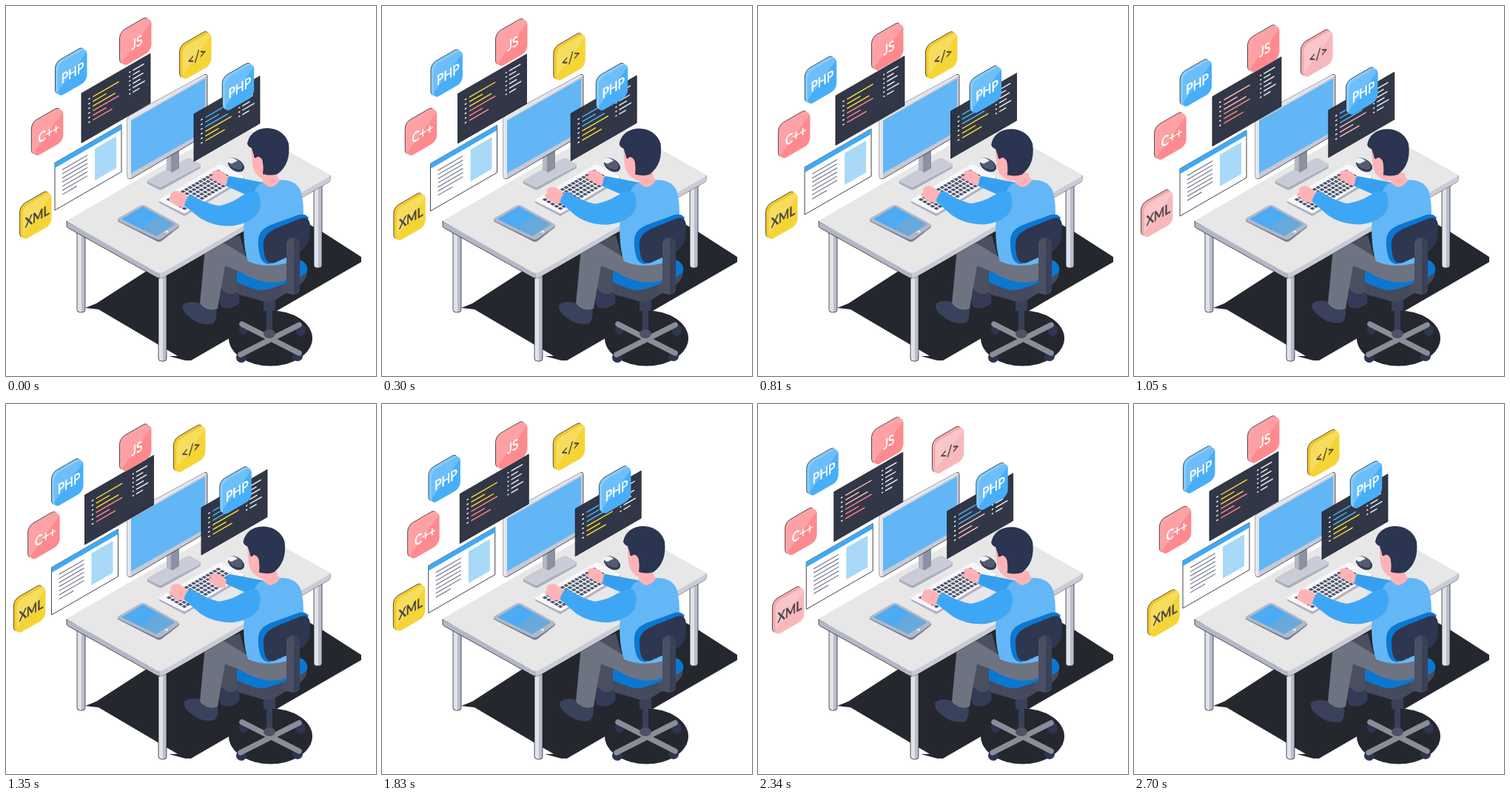
Animation, 500 px wide and 500 px high, one loop 2760 ms. Source, as an HTML page:

```html
<!DOCTYPE html>
<html lang="en">
<head>
<meta charset="utf-8">
<title>Programmer at a desk</title>
<style>
  html, body { margin: 0; width: 100%; height: 100%; overflow: hidden; background: #fff; }
  svg { display: block; width: 100vw; height: 100vh; --yellow: #f5d535; --amber: #f3c92f; }
  svg.rosy { --yellow: #f8b8bb; --amber: #f5a9ad; }
  text { font: 18px Lato, sans-serif; text-anchor: middle; stroke-width: .6; }
  .edge { stroke: #15171c; stroke-width: .7; }
  .line { fill: none; stroke-linecap: round; }
  .skin { fill: #ffb3b6; }
</style>
</head>
<body>
<svg id="stage" viewBox="0 0 500 500">
  <defs>
    <linearGradient id="sheen" x2=".7" y2="1">
      <stop offset=".55" stop-color="#fff" stop-opacity=".2"/>
      <stop offset=".55" stop-color="#fff" stop-opacity="0"/>
    </linearGradient>
    <linearGradient id="leg">
      <stop offset=".55" stop-color="#e0e2e9"/>
      <stop offset=".55" stop-color="#b9bcca"/>
    </linearGradient>
  </defs>

  <!-- Shadows -->
  <path fill="#24272e" d="M107 408L122 402 345 258 427 305 480 339V346L250 479H242L220 473H232L125 410Z"/>
  <ellipse fill="#24272e" cx="357.500" cy="449" rx="56.500" ry="37.500"/>

  <!-- Chair base and seat -->
  <g fill="#2d3550">
    <ellipse cx="321" cy="437" rx="6" ry="7"/><ellipse cx="398" cy="438" rx="7" ry="8"/>
    <ellipse cx="318" cy="475" rx="7" ry="7"/><ellipse cx="394" cy="473" rx="7" ry="7"/>
  </g>
  <path class="line" stroke="#8b8e99" stroke-width="7.500" d="M319 430L396 469M396 431L317 471"/>
  <path fill="#3a4058" d="M348 385H364V412H360V440H352V412H348Z"/>
  <ellipse fill="#4d5265" cx="356" cy="443" rx="8" ry="6"/>
  <path fill="#454a5d" d="M295 354L335 342 404 352C409 360 406 370 398 376L364 397Q352 402 340 397L308 388Q297 384 296 376Z"/>
  <path fill="#0a78d1" d="M303 364L350 341 400 344Q409 350 407 359Q402 367 360 381Q344 387 331 381L306 371Q302 368 303 364Z"/>

  <!-- Legs -->
  <path fill="#4b5060" d="M276 322L316 310 326 345 312 350 312 388Q302 394 291 386L292 345Z"/>
  <path fill="#343b57" d="M291 382Q301 394 313 386Q317 393 315 402Q305 411 293 408Q287 404 289 392Z"/>
  <g id="foot"><path fill="#3a415c" d="M239 404Q247 397 263 402Q276 411 284 410Q286 422 280 429Q263 433 249 421Q237 413 239 404Z"/></g>
  <path fill="#6e7381" d="M269 328Q280 316 298 322L338 347 388 338Q397 350 388 364Q374 376 352 373Q335 371 318 360L296 351 286 409Q272 414 262 402Z"/>

  <!-- Desk -->
  <g class="edge" fill="url(#leg)">
    <rect x="416" y="238" width="11" height="116" rx="4"/>
    <rect x="96" y="296" width="11" height="118" rx="4"/>
    <rect x="206" y="356" width="11" height="124" rx="4"/>
  </g>
  <path class="edge" fill="#b3b6c4" d="M82 291V297Q82 299 84 300L204 367Q208 369 212 367L436 238Q438 237 438 235V229L208 355Z"/>
  <path fill="#c9ccd6" d="M208 360L438 229V235Q438 237 436 238L212 367Q210 368 208 368Z"/>
  <path fill="#e7e7e8" d="M84 289L309 159Q312 157 315 159L436 227Q439 229 436 231L212 360Q208 362 204 360L84 292Q81 290.500 84 289Z"/>

  <!-- Monitor -->
  <path fill="#a9adbc" d="M191 236V240L206 248Q208 249 211 248L263 219V215L208 240Z"/>
  <path fill="#c9ccd6" d="M193 234L244 206Q247 205 250 206L262 213Q264 215 262 217L211 244Q208 246 205 244L193 238Q190 236 193 234Z"/>
  <path fill="#8b90a2" d="M217 198L234 190V219L225 225 217 221Z"/>
  <path fill="#b3b7c5" d="M217 198L223 195V224L217 221Z"/>
  <path class="edge" fill="#c7cad5" d="M164 153Q164 150 167 148L268 93Q272 91 272 95V170Q272 173 270 174L170 233Q164 235 164 230Z"/>
  <path fill="#e3e5eb" d="M164 153Q164 150 167 148L268 93 272 94 169 154V233Q164 234 164 230Z"/>
  <path fill="#62b6f6" d="M169 155L269 98V169L169 226Z"/>

  <!-- Tablet -->
  <path fill="#777d92" d="M151 289V291L204 318Q208 320 211 317L234 299V296L207 314Z"/>
  <path fill="#b3b7c6" d="M153 286L181 270Q185 268 189 270L232 294Q236 297 232 299L211 314Q207 317 203 315L153 291Q149 288 153 286Z"/>
  <path fill="#4dabf3" d="M156 288L185 271 228 295 203 311Z"/>
  <path fill="#68a9dc" d="M209 284L228 295 203 311 185 302Q194 288 209 284Z"/>
  <ellipse fill="#e6e8ee" cx="217" cy="305" rx="2.500" ry="1.500"/>

  <!-- Keyboard and mouse -->
  <path fill="#aeb2c1" d="M207 262V266L241 284 322 236V231L241 278Z"/>
  <path fill="#f8f8fa" d="M208 261L287 215Q290 213 293 215L320 229Q323 231 320 233L244 279Q241 281 238 279L208 264Q205 262 208 261Z"/>
  <g id="keys" fill="#50576d" transform="matrix(.866 -.5 .866 .5 207 262)"/>
  <ellipse fill="#343b54" cx="311" cy="215" rx="12" ry="8" transform="rotate(32 311 215)"/>
  <ellipse fill="#545b73" cx="310" cy="213" rx="11" ry="6.500" transform="rotate(32 310 213)"/>
  <path fill="#f0f1f5" d="M299 208Q303 203 310 207L313 209 305 213Q299 212 299 208Z"/>

  <g id="floaters"/>

  <!-- Person -->
  <path fill="#369ff0" d="M297 232L303 230 350 239V256L322 254 297 243Z"/>
  <g id="rightHand"><path class="skin" d="M300 231L298 241Q289 242 284 237L276 233Q274 230 279 229L278 225Q279 222 284 222Q293 222 300 231Z"/></g>
  <path class="skin" d="M347 222L366 226Q366 233 371 235V246Q359 252 347 243Z"/>
  <path fill="#64b7f6" d="M338 246Q342 240 348 239Q358 252 371 235Q396 235 400 256Q404 278 400 300L390 344Q355 357 327 345Q319 322 322 280Z"/>
  <g id="leftArm">
    <path class="skin" d="M247 261L241 271Q233 273 227 268L221 264Q218 261 223 259L222 255Q224 250 231 250Q240 251 247 261Z"/>
    <path fill="#3ea7f5" d="M250 255Q267 266 288 270Q306 266 318 257Q330 249 340 251Q347 263 342 277Q334 292 308 297Q282 299 263 287L241 270Q242 260 250 255Z"/>
  </g>

  <!-- Chair back -->
  <path fill="#0a78d1" d="M341 323C340 306 346 301 360 295L393 283Q403 279 409 286L402 300 356 349Q342 349 341 323Z"/>
  <path fill="#2e3650" d="M348 326C347 311 354 306 366 300L398 287Q411 283 411 299C411 318 408 326 394 333L363 347Q349 351 348 326Z"/>
  <path fill="#4a5064" d="M379 320Q380 314 388 313Q397 314 397 321V384Q396 389 388 390L374 387V376L379 374Z"/>
  <path fill="#3b4158" d="M389 313Q397 314 397 321V384Q396 388 389 390Z"/>

  <g id="head">
    <path class="skin" d="M331 188L365 205 366 230Q355 238 347 234Q335 228 333 214Z"/>
    <path fill="#2b3450" d="M326 186C328 176 334 169 345 166C362 162 378 171 382 186C384 205 379 218 367 227Q358 230 347 227Q349 214 345 207Q341 201 338 205Q335 206 335 202L332 192Q327 190 326 186Z"/>
    <ellipse class="skin" cx="342" cy="211" rx="5" ry="7" transform="rotate(-12 342 211)"/>
  </g>
</svg>
<script>
const STEP = 30, LAST = 2700, LOOP = 2760;
const $ = id => document.getElementById(id);
const stage = $('stage');
const floaters = [];
const rad = deg => deg * Math.PI / 180;

// Straight drift out and back, or an elliptical orbit with a phase per axis.
const drift = (x, y, dx, dy) => a => {
  const k = (1 - Math.cos(a)) / 2;
  return [x + dx * k, y + dy * k];
};
const orbit = (x, y, rx, ry, px, py) => a =>
  [x + rx * Math.cos(a - rad(px)), y + ry * Math.cos(a - rad(py))];

function addFloater(markup, path) {
  const g = document.createElementNS('http://www.w3.org/2000/svg', 'g');
  g.innerHTML = markup;
  $('floaters').append(g);
  floaters.push({ g, path });
}

const rule = (x, y, length, color) =>
  `<path class="line" stroke="${color}" stroke-width="1.700" d="M${x} ${y}h${length}"/>`;

const wall = content => `<g transform="matrix(1 -.577 0 1 0 0)">${content}</g>`;

function codePanel(w, h, first, second, path) {
  let s = `<rect class="edge" width="${w}" height="${h}" fill="#292f40" opacity=".96"/>`;
  [34, 17, 29, 34, 17, 25].forEach((length, i) => {
    const y = 13.5 + i * 6.3;
    s += rule(10, y, 1, '#fff') + rule(16, y, length, i < 3 ? first : second);
  });
  [14, 8, 13, 9, 15, 8].forEach((length, i) => {
    const y = 9 + i * 5.9;
    s += rule(w - 28, y, .6, '#fff') + rule(w - 23, y, length, '#e8eaf0');
  });
  addFloater(wall(s), path);
}

function pagePanel(path) {
  let s = '<rect class="edge" width="90" height="64" fill="#fff"/>' +
    '<path fill="#3fa9f5" d="M0 0h90v7h-90z"/><path fill="#a8d9f8" d="M54 12h29v43h-29z"/>';
  for (let i = 0; i < 7; i++)
    s += `<path stroke="#777c92" stroke-width="1.400" d="M10 ${15 + i * 5.6}h${i < 6 ? 34 : 20}"/>`;
  addFloater(wall(s), path);
}

const themes = {
  blue: ['#48aef7', '#83cbfb', '#fff'],
  pink: ['#fd8a8f', '#ffa3a6', '#fff'],
  yellow: ['var(--yellow)', 'var(--amber)', '#47434a']
};

function tile(label, theme, path) {
  const [face, side, ink] = themes[theme];
  const square = (i, attrs) => `<rect x="-22.500" y="-22.500" width="45" height="45" rx="8" ${attrs}
    transform="matrix(.866 -.5 0 1 ${24 - i} ${33 - i * .6})"/>`;
  let s = '';
  for (let i = 4; i > 0; i--) s += square(i, `fill="${side}" ${i === 4 ? 'class="edge"' : ''}`);
  s += square(0, `fill="${face}"`) + square(0, 'fill="url(#sheen)"');
  s += `<text fill="${ink}" stroke="${ink}" transform="matrix(.866 -.5 0 1 24 33)" y="6.500">${label}</text>`;
  addFloater(s, path);
}

codePanel(93, 67, 'var(--yellow)', '#ff8388', drift(102, 118, 4.5, 5));
pagePanel(drift(66, 212, -4.5, 9));
codePanel(89, 64, '#4db2f8', 'var(--yellow)', drift(254, 146, 10, -6));
tile('JS', 'pink', drift(153, 16, 0, 11));
tile('PHP', 'blue', drift(66, 57, -5, 17));
tile('C++', 'pink', orbit(31.5, 142, 4.7, 4, 300, 200));
tile('XML', 'yellow', orbit(14, 248, 5, 5, 325, 55));
tile('&lt;/&gt;', 'yellow', orbit(230, 31.5, 5, 5.5, 325, 55));
tile('PHP', 'blue', orbit(290, 81, 4.5, 4, 293, 200));

let keys = '';
for (let row = 0; row < 5; row++)
  for (let col = 0; col < 15; col++)
    keys += `<rect x="${6 + col * 5.5}" y="${5 + row * 6}" width="4.200" height="4.500" rx="1"/>`;
$('keys').innerHTML = keys;

// Eased value through [time, value] pairs.
function track(t, points) {
  const i = points.findIndex(p => p[0] > t);
  if (i < 0) return points[points.length - 1][1];
  const [t0, v0] = points[i - 1], [t1, v1] = points[i];
  return v0 + (v1 - v0) * (1 - Math.cos(Math.PI * (t - t0) / (t1 - t0))) / 2;
}
const headTrack = [[0, 0], [120, 0], [480, 1], [1170, 1], [1530, 0], [1920, 0], [2250, 1], [2370, 1], [2670, 0]];
const leftTrack = [[0, 0], [420, 1], [1950, 1], [2280, 0]];
const rightTrack = [[0, 0], [1080, 0], [1320, 1], [1440, 1], [1740, 0]];

const pose = (id, transform) => $(id).setAttribute('transform', transform);
const within = (t, from, to) => t >= from && t < to;

function draw(now) {
  const t = Math.min(LAST, Math.floor(now % LOOP / STEP) * STEP);
  const angle = t / LAST * 2 * Math.PI;
  for (const { g, path } of floaters) g.setAttribute('transform', `translate(${path(angle)})`);

  const lean = track(t, headTrack), left = track(t, leftTrack), right = track(t, rightTrack);
  pose('head', `translate(${-10 * lean} ${lean}) rotate(${-lean} 358 235)`);
  pose('leftArm', `rotate(${3.7 * left} 335 260)`);
  pose('rightHand', `translate(${-2 * right} ${7 * right})`);
  const tap = (1 - Math.cos(angle)) / 2;
  pose('foot', `translate(${2 * tap} ${-2 * tap})`);
  stage.classList.toggle('rosy', within(t, 900, 1200) || within(t, 2190, 2490));
}

const start = performance.now();
function tick() {
  draw(performance.now() - start);
  requestAnimationFrame(tick);
}
tick();
</script>
</body>
</html>
```
